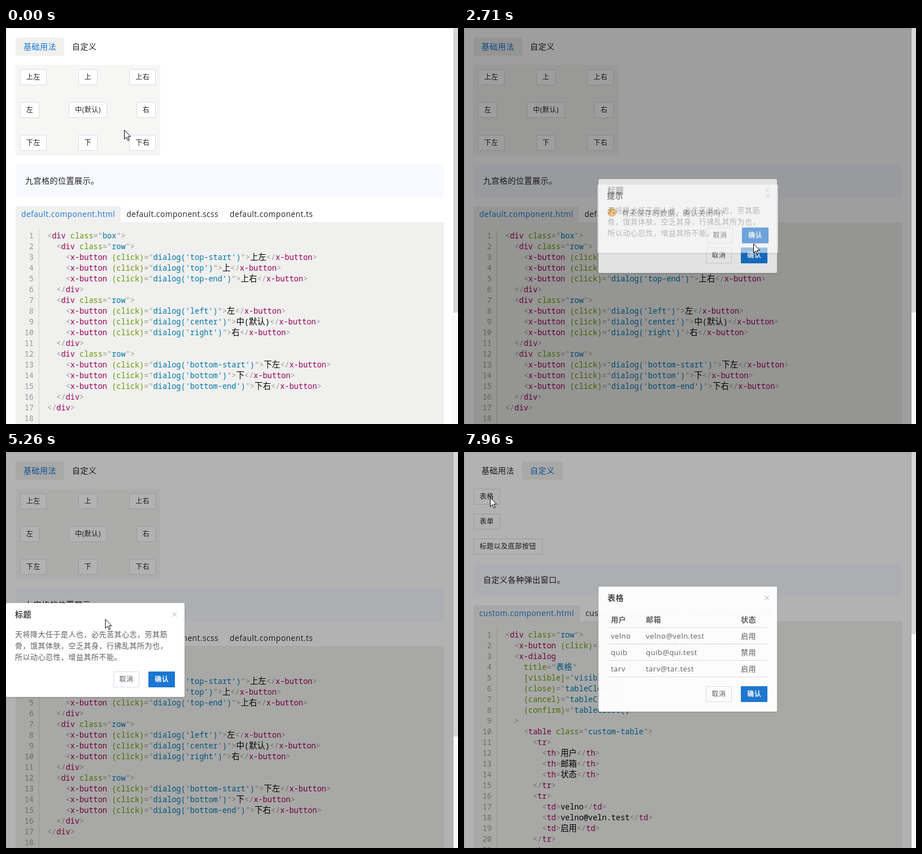
Recreate the animation shown at these times as an HTML page. Size 800x700 px, loop 8 s.

```html
<!DOCTYPE html>
<html lang="zh-CN">
<head>
<meta charset="utf-8">
<title>Dialog demo</title>
<style>
* { box-sizing: border-box; }
html, body { margin: 0; width: 100%; height: 100%; overflow: hidden; background: #fff; }
body {
  font: 14px/20px "Open Sans", "Noto Sans CJK SC", "Noto Sans CJK", sans-serif;
  letter-spacing: .5px; color: #222;
}
#stage { position: absolute; inset: 0 auto auto 0; width: 800px; height: 700px; overflow: hidden; }
#view { position: absolute; width: 792px; height: 700px; overflow: hidden; }

/* page */
.page { position: absolute; width: 792px; height: 1000px; padding: 16px; border: 1px solid #ededed; background: #fff; }
.tabs { display: flex; height: 32px; margin-bottom: 16px; line-height: 32px; }
.tabs span { padding: 0 14px; }
.files { display: flex; height: 28px; font-size: 13.7px; line-height: 28px; margin-top: 16px; }
.files span { padding: 0 10px; }
.on { background: #f0f0ef; color: #1976d2; border-radius: 2px 2px 0 0; }
.grid { width: 256px; height: 160px; padding: 8px; background: #f6f6f5; }
.grid, .stack { display: flex; flex-direction: column; justify-content: space-between; }
.grid div { display: flex; justify-content: space-between; }
.stack { height: 116px; align-items: flex-start; }
.desc { height: 58px; margin-top: 16px; padding-left: 17px; background: #f7f9fe; line-height: 58px; }
.btn {
  display: inline-block; height: 28px; padding: 0 9.8px; border: 1px solid #d9dde9; border-radius: 1px;
  background: #fff; font-size: 12px; line-height: 26px; white-space: nowrap;
}
.code {
  display: flex; height: 700px; padding-top: 14px; background: #f0f0ef;
  font: 13.6px/19px "Noto Sans Mono", "DejaVu Sans Mono", "Noto Sans CJK SC", monospace; letter-spacing: 0;
}
.code pre { margin: 0; font: inherit; color: #000; }
.code .nums { width: 42px; padding-right: 9px; border-right: 1px solid #d2d2d2; text-align: right; color: #999; }
.code .src { padding-left: 14px; }
.src i { font-style: normal; color: #999; }
.src b { font-weight: 400; color: #905; }
.src u { text-decoration: none; color: #690; }
.src s { text-decoration: none; color: #07a; }
.src em { font-style: normal; font-size: 14.4px; line-height: 1; }

/* dialogs */
.mask { position: absolute; inset: 0; background: rgba(0, 0, 0, .3); }
.dialog {
  position: absolute; left: 238px; top: 267px; width: 316px; height: 166px; padding: 0 16px;
  border-radius: 2px; background: #fff; box-shadow: 0 1px 3px rgba(0, 0, 0, .2);
  font-size: 13px; color: #5c5e63;
}
.dialog h4 { margin: 10px 0 15px; font-size: 14px; line-height: 20px; color: #444; }
.dialog p { margin: 0; white-space: nowrap; }
.dialog .x { position: absolute; right: 13px; top: 15px; }
.foot { position: absolute; right: 17px; bottom: 17px; display: flex; gap: 16px; }
.foot .ok { border-color: #1976d2; background: #1976d2; color: #fff; font-weight: 700; }
#left { left: 0; }
#prompt { left: 236px; top: 290px; width: 320px; height: 121px; padding: 0 17px; }
#prompt h4 { margin-bottom: 10px; }
#prompt p { padding-left: 26px; }
#prompt p::before {
  content: "!"; position: absolute; left: 18px; top: 41px; width: 16px; height: 16px; border-radius: 50%;
  background: #e6a23c; color: #fff; font: 700 12px/16px "Open Sans", sans-serif; letter-spacing: 0; text-align: center;
}
#table { top: 239px; height: 221px; }
#table h4 { margin-bottom: 14px; }
#table .row { display: flex; height: 29px; padding-left: 6px; border-bottom: 1px solid #dcdcdc; line-height: 29px; margin-right: 1px; }
#table .row:nth-of-type(1) { font-weight: 700; }
.row span:nth-child(1) { width: 62px; }
.row span:nth-child(2) { width: 168px; }

/* scrollbar and pointer */
#bar { position: absolute; left: 792px; width: 8px; height: 700px; background: #fafafa; }
#thumb { height: 503px; background: #d6d6d6; }
#pointer { position: absolute; left: -16px; top: -12px; width: 40px; height: 40px; overflow: hidden; }
#shapes { display: block; fill: #fff; stroke: #000; stroke-width: 1; stroke-linejoin: round; }

/* motion: one shared 8 s clock, 1% = 80 ms */
#page2, #thumb, #pointer, #shapes, .mask, .dialog, .hot { animation: 8s ease infinite; }
#page2 { animation-name: page2; animation-timing-function: step-end; }
#thumb { animation-name: thumb; animation-timing-function: step-end; }
#pointer { animation-name: path; animation-timing-function: ease-in-out; }
#shapes { animation-name: shape; animation-timing-function: step-end; }
#main { animation-name: main; }
#mainMask { animation-name: mainMask; }
#prompt { animation-name: prompt; }
#promptMask { animation-name: promptMask; }
#left { animation-name: left; }
#leftMask { animation-name: leftMask; }
#table { animation-name: table; }
#tableMask { animation-name: tableMask; }
#btnCenter { animation-name: hotCenter; }
#btnLeft { animation-name: hotLeft; }
#btnTable { animation-name: hotTable; }
#prompt .hot { animation-name: hotPrompt; }
#main .hot { animation-name: hotMain; }

@keyframes page2 { 0% { visibility: hidden; } 82.1%, 100% { visibility: visible; } }
@keyframes thumb { 0% { height: 503px; } 82.1%, 100% { height: 322px; } }

@keyframes main {
  0%, 7.6% { opacity: 0; transform: translateY(-32px); }
  10.1%, 36.65% { opacity: 1; transform: none; }
  39.15%, 100% { opacity: 0; transform: translateY(-32px); }
}
@keyframes mainMask { 0%, 7.6% { opacity: 0; } 9.3%, 36.65% { opacity: 1; } 38.65%, 100% { opacity: 0; } }
@keyframes prompt {
  0%, 20% { opacity: 0; transform: translateY(-32px); }
  22.5%, 33.25% { opacity: 1; transform: none; }
  35.75%, 100% { opacity: 0; transform: translateY(-32px); }
}
@keyframes promptMask { 0%, 20% { opacity: 0; } 21.9%, 33.25% { opacity: 1; } 35%, 100% { opacity: 0; } }
@keyframes left {
  0%, 57.75% { opacity: 0; transform: translateX(-14px); }
  60.25%, 70.75% { opacity: 1; transform: none; }
  73.25%, 100% { opacity: 0; transform: translateX(-4px); }
}
@keyframes leftMask { 0%, 57.75% { opacity: 0; } 59.6%, 70.75% { opacity: 1; } 72.5%, 100% { opacity: 0; } }
@keyframes table { 0%, 97.87% { opacity: 0; transform: translateY(-32px); } 100% { opacity: 1; transform: none; } }
@keyframes tableMask { 0%, 97.87% { opacity: 0; } 99.7%, 100% { opacity: 1; } }

@keyframes hotCenter {
  4%, 7.8% { background: #e6f1fc; border-color: #8fbdec; color: #1976d2; }
  0%, 3%, 9.4%, 100% { background: #fff; border-color: #d9dde9; color: #222; }
}
@keyframes hotMain {
  18.5%, 20% { background: #e6f1fc; border-color: #a9cff4; color: #1976d2; }
  0%, 17.5%, 21.5%, 100% { background: #fff; border-color: #d9dde9; color: #444; }
}
@keyframes hotPrompt {
  23.5%, 28% { background: #e6f1fc; border-color: #a9cff4; color: #1976d2; }
  0%, 22%, 30%, 100% { background: #fff; border-color: #d9dde9; color: #444; }
}
@keyframes hotLeft {
  56.5%, 58% { background: #e0edfa; border-color: #7fb5ea; color: #1976d2; }
  0%, 55%, 60%, 100% { background: #fff; border-color: #d9dde9; color: #222; }
}
@keyframes hotTable {
  95%, 97.9% { background: #e6f1fc; border-color: #8fbdec; color: #1976d2; }
  0%, 93.5%, 99.7%, 100% { background: #fff; border-color: #d9dde9; color: #222; }
}

@keyframes path {
  0%, .9% { transform: translate(209px, 180px); }
  5%, 7.5% { transform: translate(150px, 148px); animation-timing-function: ease-in; }
  8.75% { transform: translate(200px, 167px); animation-timing-function: ease-out; }
  12.6%, 15.5% { transform: translate(380px, 330px); }
  18.5%, 20.2% { transform: translate(443px, 395px); }
  22.5%, 27% { transform: translate(443px, 381px); }
  31.5%, 38.1% { transform: translate(512px, 381px); }
  47%, 48.4% { transform: translate(122px, 194px); }
  51.2%, 53.1% { transform: translate(92px, 150px); }
  56.3%, 58.2% { transform: translate(33px, 139px); }
  62.9%, 63.9% { transform: translate(130px, 250px); }
  68.8%, 73.5% { transform: translate(281px, 400px); }
  79.2%, 87.8% { transform: translate(138px, 38px); }
  95%, 100% { transform: translate(46px, 80px); }
}
@keyframes shape {
  0%, 7.9%, 20.5%, 33.8%, 57.8%, 73.3%, 88.8%, 98.1%, 100% { transform: none; }
  4%, 18.2%, 21.9%, 55.6%, 67.5%, 78.8%, 94% { transform: translateX(-40px); }
  70.9% { transform: translateX(-80px); }
}
</style>
</head>
<body>
<div id="stage">
  <div id="view">
    <div class="page" id="page1"></div>
    <div class="page" id="page2"></div>
  </div>
  <div id="bar"><div id="thumb"></div></div>
  <div id="pointer">
    <svg id="shapes" width="120" height="40">
      <path d="M16.5 12.5v16l3.7-3.5 2.7 6 2.4-1.1-2.7-5.8h5z"/>
      <path d="M54.5 25v-11c0-2 3-2 3 0v6c0-1.500 3-1.500 3 .5 0-1.500 3-1.300 3 .7 0-1.300 2.500-1.200 2.500.8v6c0 3-2 4-2 7.500h-8.500c0-3-4-5.500-5.500-9.500-.8-2.200 1.500-3 2.800-1.500zM57.500 20v4M60.500 21v3M63.500 22v2"/>
      <path fill="none" d="M93 4.500h2l1.500 1 1.500-1h2M96.500 5.500v13M93 19.500h2l1.500-1 1.500 1h2"/>
    </svg>
  </div>
</div>
<script>
const $ = id => document.getElementById(id);
const button = (text, id) => `<span class="btn${id ? ' hot' : ''}"${id ? ` id="${id}"` : ''}>${text}</span>`;

function highlight(src) {
  const attrs = text => text.replace(/([\w\[\]()-]+)="([^"]*)"/g, '<u>$1</u><i>="</i><s>$2</s><i>"</i>');
  return src
    .replace(/<(\/?)([\w-]+)([^>]*)>/g, (_, slash, name, rest) =>
      `<i>&lt;${slash}</i><b>${name}</b>${attrs(rest)}<i>&gt;</i>`)
    .replace(/[\u4e00-\u9fff]+/g, '<em>$&</em>');
}

function buildPage(id, active, demo, desc, name, src) {
  const tabs = ['基础用法', '自定义'].map((t, i) => `<span class="${i === active ? 'on' : ''}">${t}</span>`);
  const files = ['html', 'scss', 'ts'].map((ext, i) => `<span class="${i ? '' : 'on'}">${name}.component.${ext}</span>`);
  const nums = Array.from({ length: 24 }, (_, i) => i + 1).join('\n');
  $(id).innerHTML = `<div class="tabs">${tabs.join('')}</div>${demo}<div class="desc">${desc}</div>
    <div class="files">${files.join('')}</div>
    <div class="code"><pre class="nums">${nums}</pre><pre class="src">${highlight(src)}</pre></div>`;
}

function addDialog(id, title, body) {
  $('view').insertAdjacentHTML('beforeend', `<div class="mask" id="${id}Mask"></div>
    <div class="dialog" id="${id}"><h4>${title}</h4>
    <svg class="x" width="10" height="10" stroke="#aaa"><path d="M1 1l8 8M9 1l-8 8"/></svg>${body}
    <div class="foot"><span class="btn hot">取消</span><span class="btn ok">确认</span></div></div>`);
}

const rows = [
  [['上左', 'top-start'], ['上', 'top'], ['上右', 'top-end']],
  [['左', 'left', 'btnLeft'], ['中(默认)', 'center', 'btnCenter'], ['右', 'right']],
  [['下左', 'bottom-start'], ['下', 'bottom'], ['下右', 'bottom-end']]
];
const grid = rows.map(r => `<div>${r.map(([text, , id]) => button(text, id)).join('')}</div>`).join('');
const gridSrc = rows.map(r => `  <div class="row">\n${r.map(([text, place]) =>
  `    <x-button (click)="dialog('${place}')">${text}</x-button>\n`).join('')}  </div>\n`).join('');
buildPage('page1', 0, `<div class="grid">${grid}</div>`, '九宫格的位置展示。', 'default',
  `<div class="box">\n${gridSrc}</div>\n`);

const people = [
  ['用户', '邮箱', '状态'],
  ['velno', 'velno@veln.test', '启用'],
  ['quib', 'quib@qui.test', '禁用'],
  ['tarv', 'tarv@tar.test', '启用']
];
const tableSrc = people.map((p, i) => `      <tr>\n${p.map(text => {
  const cell = i ? 'td' : 'th';
  return `        <${cell}>${text}</${cell}>\n`;
}).join('')}      </tr>\n`).join('');
buildPage('page2', 1,
  `<div class="stack">${button('表格', 'btnTable')}${button('表单')}${button('标题以及底部按钮')}</div>`,
  '自定义各种弹出窗口。', 'custom',
  `<div class="row">
  <x-button (click)="customTable()">表格</x-button>
  <x-dialog
    title="表格"
    [visible]="visibleTable"
    (close)="tableClose()"
    (cancel)="tableClose()"
    (confirm)="tableClose()"
  >
    <table class="custom-table">
${tableSrc}`);

const saying = '<p>天将降大任于是人也，必先苦其心志，劳其筋<br>骨，饿其体肤，空乏其身，行拂乱其所为也，<br>所以动心忍性，增益其所不能。</p>';
addDialog('main', '标题', saying);
addDialog('prompt', '提示', '<p>有未保存的数据，确认关闭吗?</p>');
addDialog('left', '标题', saying);
addDialog('table', '表格', people.map(p =>
  `<div class="row">${p.map(text => `<span>${text}</span>`).join('')}</div>`).join(''));
</script>
</body>
</html>
```
